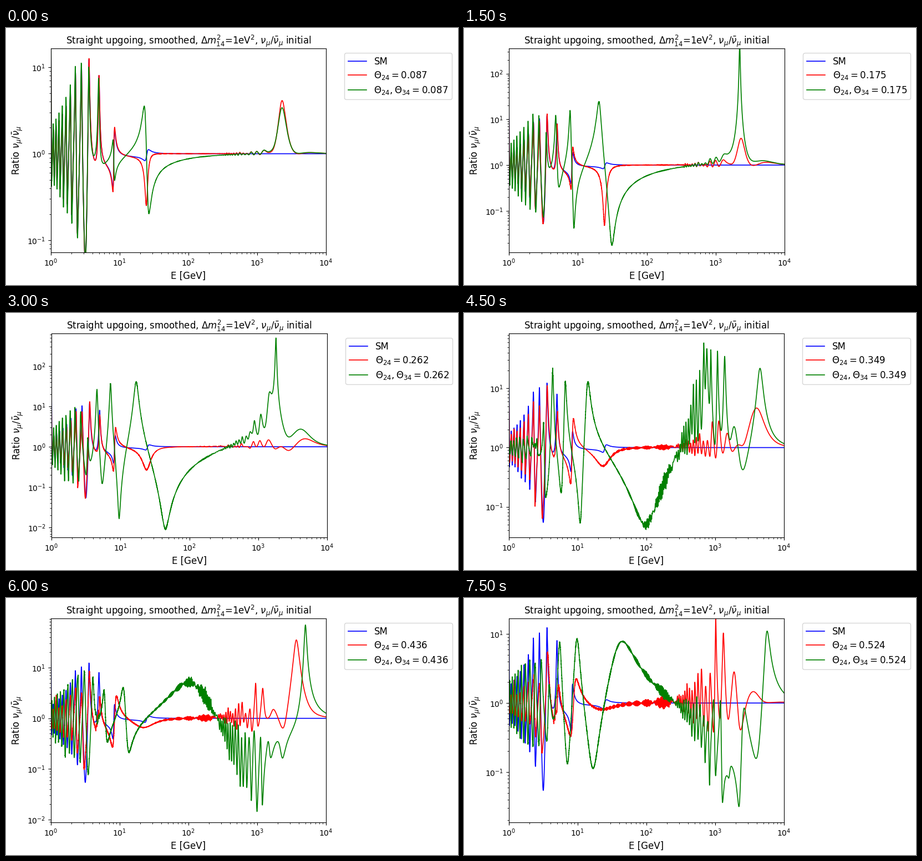
Recreate the animation shown at these times as a matplotlib script. Size 815 by 465 pixels, loop 8000 ms.

```python
import numpy as np
import matplotlib.pyplot as plt
from matplotlib.animation import FuncAnimation

W, H, DPI = 815, 465, 100
TOP, BOTTOM = 37, 406
HOLD, STEP, FRAMES = 3, 500, 16

# mixing angle, axes left and width, height of ratio 1, pixels per decade
VIEWS = [
    (0.087, 81, 496, 227.5, 156.5),
    (0.175, 81, 497, 248, 82.7),
    (0.262, 82, 497, 242, 73.1),
    (0.349, 81, 496, 243.5, 107),
    (0.436, 81, 496, 217.7, 91.7),
    (0.524, 81, 496, 190, 125),
]

# Neutrino masses squared in eV^2 and the three-flavour mixing angles
MASSES = np.diag([0, 7.41e-5, 2.507e-3, 1])
T12, T13, T23 = np.radians([33.41, -8.58, 42.2])  # the minus sign: CP phase of pi

# Earth from the surface to its centre: thickness in km, density, electron share
LAYERS = [(670, 3.53, .4957), (2221, 5.0, .4957),
          (2259, 11.24, .4656), (1221, 12.98, .4656)]
KINETIC = 2.534       # eV^2 / GeV to 1 / km
POTENTIAL = 3.867e-4  # per km and unit of electron density

POINTS, WINDOW = 10000, 53
energy = np.logspace(0, 4, POINTS)


def rotation(i, j, angle):
    r = np.eye(4)
    r[i, i] = r[j, j] = np.cos(angle)
    r[i, j], r[j, i] = np.sin(angle), -np.sin(angle)
    return r


def survival(t24, t34, sign):
    """Chance that a muon (anti)neutrino crosses the whole Earth unchanged."""
    u = (rotation(2, 3, t34) @ rotation(1, 3, t24) @ rotation(1, 2, T23)
         @ rotation(0, 2, T13) @ rotation(0, 1, T12))
    vacuum = KINETIC * (u @ MASSES @ u.T) / energy[:, None, None]
    psi = np.zeros((POINTS, 4), complex)
    psi[:, 1] = 1
    for length, density, share in LAYERS:
        matter = np.diag([share, 0, 0, (1 - share) / 2])
        levels, vecs = np.linalg.eigh(vacuum + sign * POTENTIAL * density * matter)
        parts = np.einsum("nij,ni->nj", vecs, psi)
        psi = np.einsum("nij,nj->ni", vecs, np.exp(-1j * levels * length) * parts)
    # the way out mirrors the way in
    return abs((psi ** 2).sum(axis=1)) ** 2


def smoothed(p):
    """Moving average whose window shrinks at both ends."""
    total = np.r_[0, np.cumsum(p)]
    i = np.arange(POINTS)
    half = np.minimum(WINDOW // 2, np.minimum(i, POINTS - 1 - i))
    return (total[i + half + 1] - total[i - half]) / (2 * half + 1)


def ratio(t24=0, t34=0):
    return smoothed(survival(t24, t34, 1)) / smoothed(survival(t24, t34, -1))


curves = [(ratio(t), ratio(t, t)) for t, *_ in VIEWS]

fig = plt.figure(figsize=(W / DPI, H / DPI), dpi=DPI, facecolor="white")
ax = fig.add_axes([0.1, 0.12, 0.6, 0.8])
ax.set_xscale("log")
ax.set_yscale("log")
ax.set_xlim(1, 1e4)
ax.set_title(r"Straight upgoing, smoothed, $\Delta m^2_{14}$=1eV$^2$, "
             r"$\nu_\mu/\bar{\nu}_\mu$ initial", fontsize=12)
ax.set_xlabel("E [GeV]", fontsize=12)
ax.set_ylabel(r"Ratio $\nu_\mu/\bar{\nu}_\mu$", fontsize=12)
ax.plot(energy, ratio(), color="blue", lw=1.2, label="SM")
red, = ax.plot(energy, curves[0][0], color="red", lw=1.2,
               label=r"$\Theta_{24}=0.087$")
green, = ax.plot(energy, curves[0][1], color="green", lw=1.2,
                 label=r"$\Theta_{24},\Theta_{34}=0.087$")
legend = ax.legend(loc="upper left", bbox_to_anchor=(1.05, 1), fontsize=12,
                   labelspacing=0.38)


def update(i):
    v = min(i // HOLD, len(VIEWS) - 1)
    theta, left, width, one, decade = VIEWS[v]
    ax.set_position([left / W, (H - BOTTOM) / H, width / W, (BOTTOM - TOP) / H])
    ax.set_ylim(10 ** ((one - BOTTOM) / decade), 10 ** ((one - TOP) / decade))
    red.set_ydata(curves[v][0])
    green.set_ydata(curves[v][1])
    texts = legend.get_texts()
    texts[1].set_text(rf"$\Theta_{{24}}={theta:.3f}$")
    texts[2].set_text(rf"$\Theta_{{24}},\Theta_{{34}}={theta:.3f}$")
    return red, green


anim = FuncAnimation(fig, update, frames=FRAMES, interval=STEP,
                     init_func=lambda: update(0), repeat=True, repeat_delay=0)
plt.show()
```
